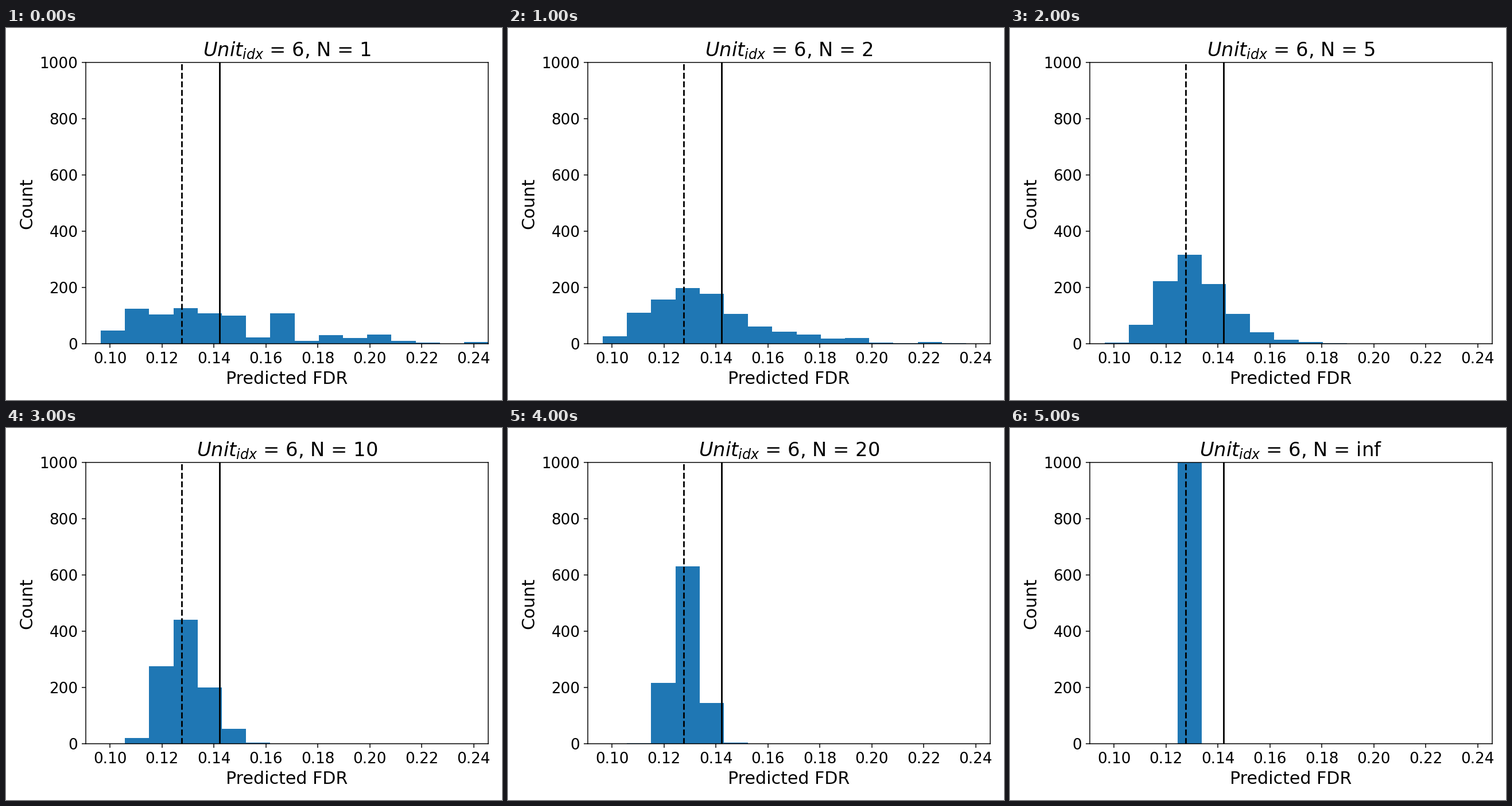
These frames come from a looping animation (864x648 px, 6 s). A matplotlib script:

```python
import numpy as np
import matplotlib.pyplot as plt
from matplotlib.animation import FuncAnimation

W, H, DPI = 864, 648, 135
LEFT, RIGHT, TOP, BOTTOM = 138.6, 840.4, 60.2, 550.4

plt.rcParams["font.family"] = "DejaVu Sans"
plt.rcParams["mathtext.fontset"] = "dejavusans"

BINS = 16
START, STEP = 0.09645, 0.009323
MEDIAN, MEAN = 0.12762, 0.14217

# Sample size and bin counts, one entry per step
STEPS = [
    ("1", [47, 126, 104, 127, 108, 100, 24, 109, 11, 32, 22, 33, 11, 5, 0, 7]),
    ("2", [28, 111, 157, 199, 178, 106, 63, 44, 34, 20, 21, 5, 2, 7, 2]),
    ("5", [4, 68, 224, 317, 212, 106, 41, 16, 7, 3]),
    ("10", [0, 22, 277, 442, 201, 53, 4]),
    ("20", [0, 2, 217, 631, 145, 5]),
    ("inf", [0, 0, 0, 1000]),
]

fig = plt.figure(figsize=(W / DPI, H / DPI), dpi=DPI, facecolor="white")
ax = fig.add_axes([LEFT / W, 1 - BOTTOM / H, (RIGHT - LEFT) / W, (BOTTOM - TOP) / H])
edges = START + STEP * np.arange(BINS)
bars = ax.bar(edges, np.zeros(BINS), width=STEP, align="edge", color="#1f77b4")
ax.axvline(MEDIAN, color="black", ls="--", lw=1.5)
ax.axvline(MEAN, color="black", lw=1.5)

ax.set_xlim(0.09063, 0.24565)
ax.set_ylim(0, 1000)
ax.set_xticks(np.arange(0.10, 0.25, 0.02))
ax.xaxis.set_major_formatter("{x:.2f}")
ax.tick_params(labelsize=14)
ax.set_xlabel("Predicted FDR", fontsize=16)
ax.set_ylabel("Count", fontsize=16)
title = ax.set_title("", fontsize=18)


def update(i):
    size, counts = STEPS[i]
    for k, bar in enumerate(bars):
        bar.set_height(counts[k] if k < len(counts) else 0)
    title.set_text(f"$Unit_{{idx}}$ = 6, N = {size}")
    return [*bars, title]


anim = FuncAnimation(fig, update, frames=len(STEPS), interval=1000,
                     repeat=True, repeat_delay=0, blit=False)
plt.show()
```
